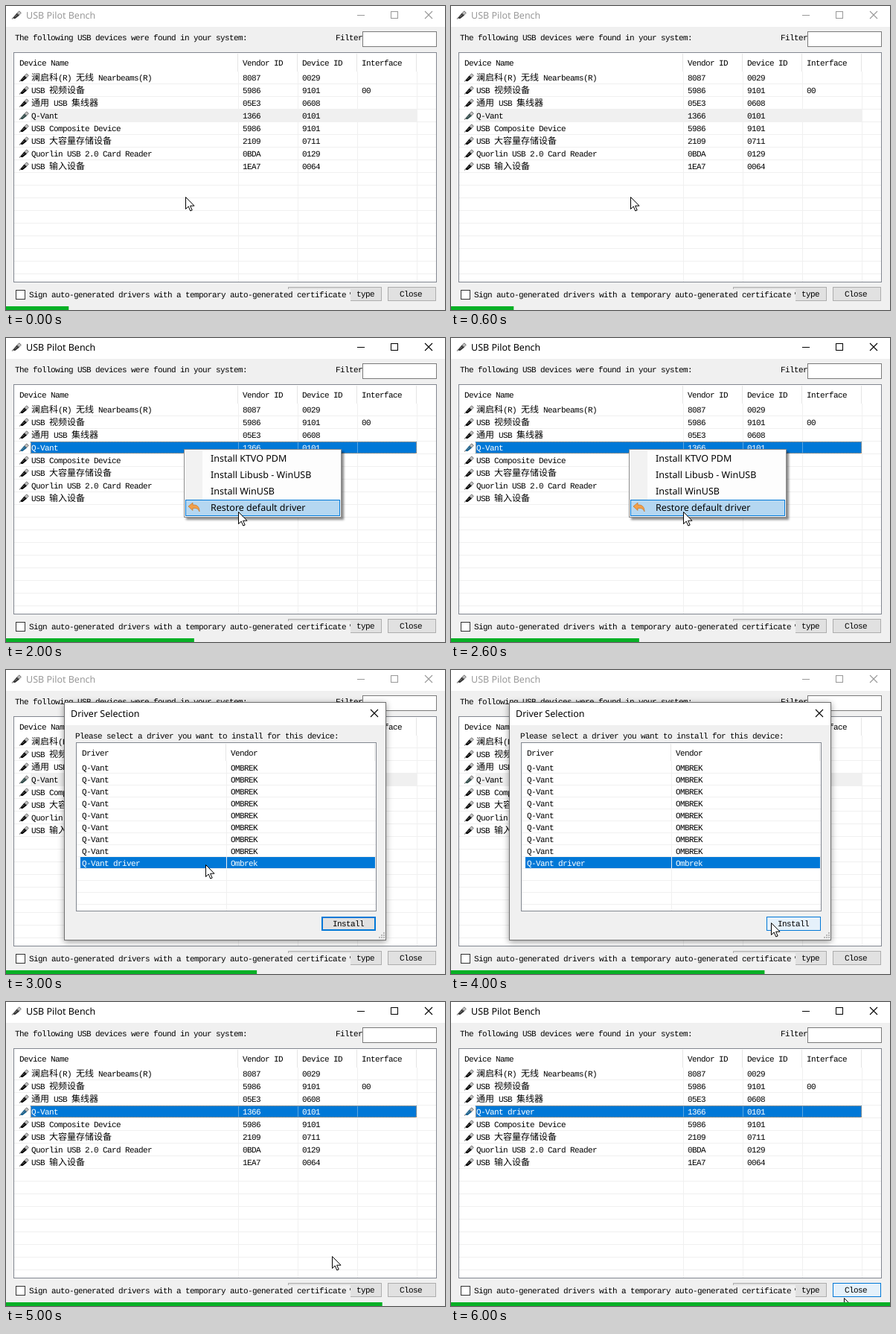
Recreate the animation shown at these times as an HTML page. Size 590 by 408 pixels, loop 7 s.

```html
<!DOCTYPE html>
<html lang="en">
<head>
<meta charset="utf-8">
<title>USB Pilot Bench</title>
<style>
html, body { margin: 0; width: 100%; height: 100%; overflow: hidden; background: #f0f0f0; }
svg { display: block; }
text { white-space: pre; text-rendering: geometricPrecision; fill: currentColor; }
.mono { font: 11px "Liberation Mono", monospace; letter-spacing: -.6px; }
.cjk { font: 12px "Noto Sans CJK SC", "Noto Sans CJK", sans-serif; letter-spacing: 0; }
.ui { font: 12.5px "Noto Sans", "Open Sans", sans-serif; }
.caption { font: bold 28px "Noto Sans", "Noto Sans CJK SC", "Noto Sans CJK", sans-serif;
  paint-order: stroke; stroke: #f0f0f0; stroke-opacity: .7; stroke-width: 3px; stroke-linejoin: round; }
rect { shape-rendering: crispEdges; }

[class^="a-"] { animation: 7s step-end infinite; }
.a-chrome { animation-name: chrome; }
.a-rowbg { animation-name: rowbg; }
.a-rowtext { animation-name: rowtext; }
.a-rowicon { animation-name: rowicon; }
.a-active { animation-name: active; }
.a-caption { animation-name: caption; }
.a-menu { animation-name: menu; }
.a-dialog { animation-name: dialog; }
.a-hover { animation-name: hover; }
.a-last { animation-name: last; }
.a-notlast { animation-name: notlast; }
.a-cursor { animation-name: cursor; }
.bar { animation: bar 7s steps(7, end) infinite; }

@keyframes chrome { 0%, 42.857% { color: #999; } 14.285%, 71.428%, 100% { color: #000; } }
@keyframes rowbg { 0%, 42.857% { color: #f0f0f0; } 14.285%, 71.428%, 100% { color: #0078d7; } }
@keyframes rowtext { 0%, 42.857% { color: #000; } 14.285%, 71.428%, 100% { color: #fff; } }
@keyframes rowicon { 0%, 42.857% { color: #2f4a48; } 14.285%, 71.428%, 100% { color: #14608f; } }
@keyframes active { 0%, 42.857% { visibility: hidden; } 14.285%, 71.428%, 100% { visibility: visible; } }
@keyframes caption { 0%, 28.571%, 100% { visibility: hidden; } 14.285% { visibility: visible; } }
@keyframes menu { 0%, 42.857%, 100% { visibility: hidden; } 28.571% { visibility: visible; } }
@keyframes dialog { 0%, 71.428%, 100% { visibility: hidden; } 42.857% { visibility: visible; } }
@keyframes hover { 0%, 71.428%, 100% { visibility: hidden; } 57.142% { visibility: visible; } }
@keyframes last { 0% { visibility: hidden; } 85.714%, 100% { visibility: visible; } }
@keyframes notlast { 0% { visibility: visible; } 85.714%, 100% { visibility: hidden; } }
@keyframes cursor {
  0% { transform: translate(241px, 256px); }
  14.285% { transform: translate(239px, 149px); }
  28.571% { transform: translate(312px, 233px); }
  42.857% { transform: translate(268px, 261px); }
  57.142% { transform: translate(430px, 339px); }
  71.428% { transform: translate(438px, 341px); }
  85.714%, 100% { transform: translate(528px, 397px); }
}
@keyframes bar { from { transform: scaleX(.142857); } to { transform: scaleX(1.142857); } }
</style>
</head>
<body>
<svg id="stage" width="590" height="408" viewBox="0 0 590 408"></svg>
<script>
const rect = (x, y, w, h, fill) => `<rect x="${x}" y="${y}" width="${w}" height="${h}" fill="${fill}"/>`;
const box = (x, y, w, h, fill, edge, t = 1) =>
  rect(x, y, w, h, edge) + rect(x + t, y + t, w - 2 * t, h - 2 * t, fill);
const group = (cls, ...parts) => `<g class="${cls}">${parts.join('')}</g>`;
const ui = (x, y, s) => `<text class="ui" x="${x}" y="${y}">${s}</text>`;
const mono = (x, y, s) => `<text class="mono" x="${x}" y="${y}">` +
  s.replace(/[\u4e00-\u9fff]+/g, m => `<tspan class="cjk">${m}</tspan>`) + '</text>';
const each = (n, f) => Array.from({ length: n }, (_, i) => f(i)).join('');
const cross = (x, y) =>
  `<path d="M${x} ${y}l10 10m0 -10l-10 10" stroke="currentColor" stroke-width="1.1" fill="none"/>`;
const plug = (x, y) => `<g transform="translate(${x} ${y})">
  <path d="M0 11.5L2 9.5" stroke="#888" stroke-width="1.2"/>
  <path d="M1.5 9.5L6.5 3.5 10 6.5 5 10.5Q2.5 12 1.5 9.5Z" fill="currentColor"/>
  <path d="M7 3.5L9.7 .8 12.3 3.2 9.7 6Z" fill="#c4c4c4" stroke="#555" stroke-width=".8"/>
  <path d="M4 8.6L7 5.6" stroke="#999" stroke-width=".9"/></g>`;
const button = (x, y, w, h, label, tx, fill = '#e1e1e1', edge = '#adadad', t = 1) =>
  box(x, y, w, h, fill, edge, t) + mono(tx, y + 13, label);

const GRID = '#f0f0f0', HEAD = '#e5e5e5', BLUE = '#0078d7', HOT = '#e5f1fb';
const cols = [312, 392, 472, 552];
const devices = [
  ['澜启科(R) 无线 Nearbeams(R)', '8087', '0029'],
  ['USB 视频设备', '5986', '9101', '00'],
  ['通用 USB 集线器', '05E3', '0608'],
  ['', '1366', '0101'],
  ['USB Composite Device', '5986', '9101'],
  ['USB 大容量存储设备', '2109', '0711'],
  ['Quorlin USB 2.0 Card Reader', '0BDA', '0129'],
  ['USB 输入设备', '1EA7', '0064'],
];
const picked = 3;

const deviceRow = (row, i) => {
  const y = 100 + 17 * i, sel = i === picked;
  const cells = row.map((s, c) => s && mono([34, 318, 398, 478][c], y, s)).join('');
  const name = sel
    ? group('a-notlast', mono(34, y, 'Q-Vant')) + group('a-last', mono(34, y, 'Q-Vant driver')) : '';
  return group(sel ? 'a-rowicon' : 'icon', plug(18, y - 10)) +
    group(sel ? 'a-rowtext' : 'row', cells, name);
};

const titleBar = () => rect(0, 0, 590, 28, '#fff') +
  `<g color="#333">${plug(8, 6)}</g>` +
  group('a-chrome', ui(27, 17, 'USB Pilot Bench'), rect(472, 12, 10, 1, 'currentColor'),
    box(517, 7, 10, 10, '#fff', 'currentColor'), cross(563, 7));

const deviceList = () => box(10, 62, 569, 309, '#fff', '#828790') +
  ['Device Name', 'Vendor ID', 'Device ID', 'Interface']
    .map((s, c) => mono([18, 318, 398, 478][c], 80, s)).join('') +
  each(16, i => rect(11, 104 + 17 * i, 567, 1, GRID)) +
  group('a-rowbg', rect(33, 139, 520, 16, 'currentColor')) +
  cols.map(x => rect(x - 1, 64, 1, 24, HEAD) + rect(x, 88, 1, 282, GRID)).join('') +
  group('a-active', cols.slice(0, 3).map(x => rect(x, 139, 1, 16, '#5ba6e2')).join(''),
    '<rect x="33.5" y="139.5" width="518" height="15" fill="none" stroke="#e8a060" stroke-dasharray="1 1"/>') +
  devices.map(deviceRow).join('');

const footer = () => button(379, 377, 126, 19, 'type', 471) +
  rect(379, 380, 84, 17, '#f0f0f0') +
  box(13, 381, 13, 13, '#fff', '#333') +
  mono(31, 391, 'Sign auto-generated drivers with a temporary auto-generated certificate') +
  rect(462, 384, 1, 3, '#555') +
  button(513, 377, 65, 19, 'Close', 529) +
  group('a-last', button(513, 377, 65, 19, 'Close', 529, HOT, BLUE));

const menu = () => group('a-menu',
  '<g style="filter:drop-shadow(3px 3px 1.5px #0007)">' + box(239, 149, 212, 92, '#fdfdfd', '#8a8a8a') + '</g>',
  rect(241, 151, 23, 88, '#f2f2f2'),
  box(241, 217, 208, 22, '#b5d7f1', BLUE),
  ['Install KTVO PDM', 'Install Libusb - WinUSB', 'Install WinUSB', 'Restore default driver']
    .map((s, i) => ui(275, 166 + 22 * i, s)).join(''),
  '<path d="M245 226l6 -5v3c6 -.5 9 3 9 9c-2 -4 -4 -5 -9 -4.5v3z" fill="#f2a04a" stroke="#c87324" stroke-width=".7"/>');

const dialogRow = i => {
  const y = 135 + 16 * i, sel = i === 8;
  return `<g color="${sel ? '#fff' : '#000'}">` + mono(102, y, sel ? 'Q-Vant driver' : 'Q-Vant') +
    mono(302, y, sel ? 'Ombrek' : 'OMBREK') + '</g>';
};

const dialog = () => group('a-dialog',
  '<g style="filter:drop-shadow(0 2px 4px #0006)">' + box(78, 43, 433, 320, '#f0f0f0', '#707070') + '</g>',
  rect(79, 44, 431, 30, '#fff'), ui(87, 63, 'Driver Selection'), cross(490, 53),
  mono(93, 92, 'Please select a driver you want to install for this device:'),
  box(94, 97, 404, 227, '#fff', '#828790'),
  mono(102, 115, 'Driver'), mono(302, 115, 'Vendor'),
  rect(295, 99, 1, 23, HEAD), rect(495, 99, 1, 23, HEAD),
  each(12, i => rect(95, 138 + 16 * i, 402, 1, GRID)),
  rect(100, 251, 396, 15, BLUE),
  rect(296, 122, 1, 201, GRID),
  each(9, dialogRow),
  button(424, 331, 73, 19, 'Install', 439, '#e1e1e1', BLUE, 2),
  [[507, 352], [504, 355], [507, 355], [501, 358], [504, 358], [507, 358]]
    .map(([x, y]) => rect(x, y, 2, 2, '#b8b8b8')).join('')) +
  group('a-hover', button(424, 331, 73, 19, 'Install', 439, HOT, BLUE));

document.getElementById('stage').innerHTML =
  rect(0, 0, 590, 408, '#f0f0f0') + titleBar() +
  mono(12, 46, 'The following USB devices were found in your system:') +
  mono(443, 46, 'Filter') + box(479, 34, 100, 21, '#fff', '#7a7a7a') +
  deviceList() + footer() + menu() + dialog() +
  group('a-caption', '<text class="caption" x="170" y="389">Right click（右键）</text>') +
  group('a-cursor', '<path d="M.5 .5V16.5L4.2 13 6.8 19 9.2 18 6.6 12.2H12Z" fill="#fff" stroke="#000"/>') +
  `<g class="bar">${rect(0, 403, 590, 5, '#06b025')}</g>`;
</script>
</body>
</html>
```
